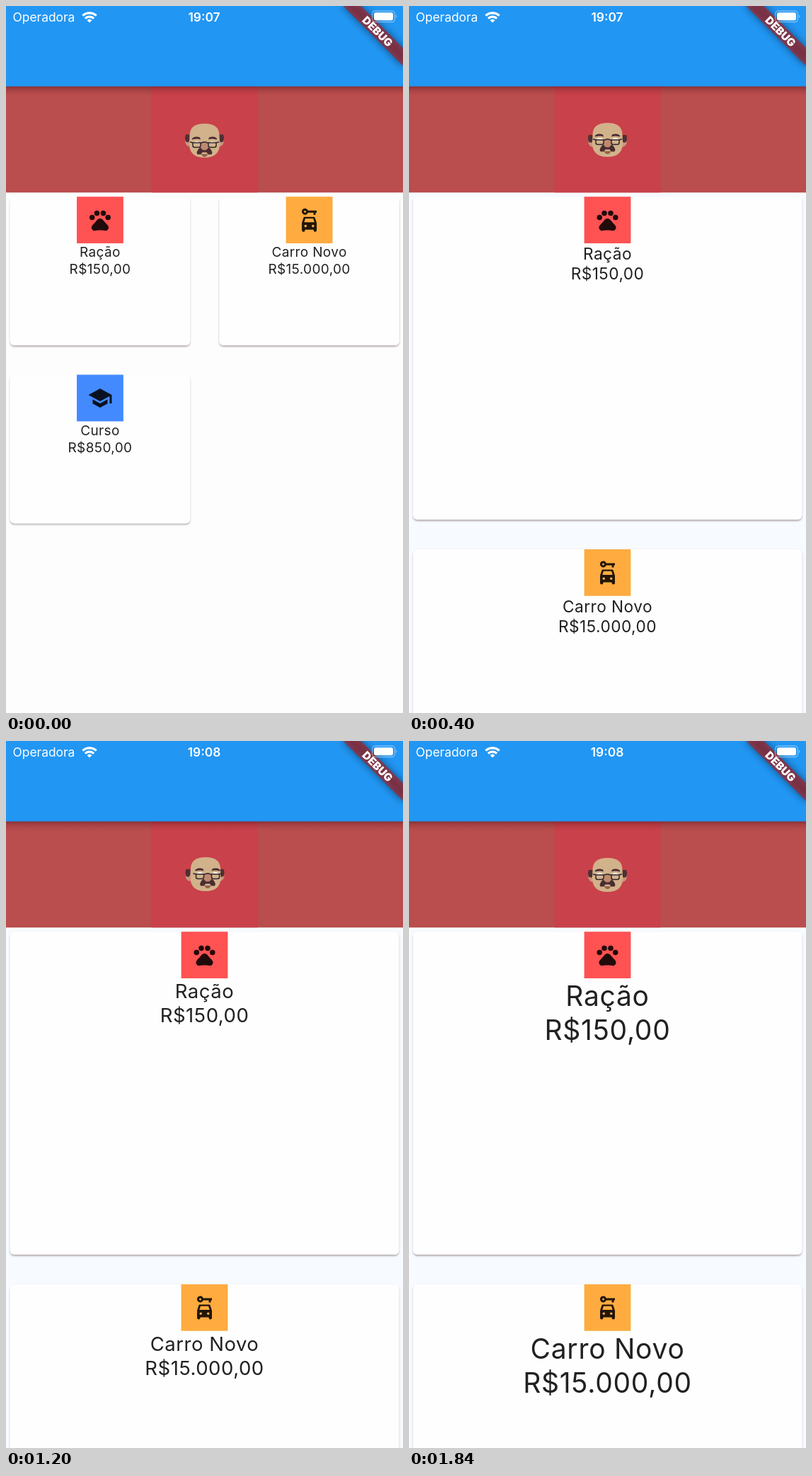
An HTML page for the animation above (2000 ms loop, 561 by 998 pixels).

```html
<!DOCTYPE html>
<html lang="pt">
<head>
<meta charset="utf-8">
<title>Lista de metas</title>
<style>
  html, body { margin: 0; width: 100%; height: 100%; overflow: hidden; background: #fdfdfd; }
  svg { display: block; width: 100%; height: 100%; }
  text { font-family: Inter, Roboto, sans-serif; }
  .label { fill: #212121; text-anchor: middle; letter-spacing: .019em; }
  .status { fill: #fff; font-size: 17.4px; }
</style>
</head>
<body>
<svg viewBox="0 0 561 998">
  <defs>
    <filter id="lift" x="-5%" y="-5%" width="110%" height="112%">
      <feDropShadow dx="0" dy="2" stdDeviation="1.1" flood-color="#201010" flood-opacity=".26"/>
      <feDropShadow dx="0" dy="1" stdDeviation="1.8" flood-color="#000" flood-opacity=".08"/>
    </filter>
    <filter id="blur" x="-30%" y="-150%" width="160%" height="400%">
      <feGaussianBlur stdDeviation="5.9"/>
    </filter>
    <linearGradient id="shade" x1="0" y1="0" x2="0" y2="1">
      <stop offset="0" stop-color="#4a0c10" stop-opacity=".45"/>
      <stop offset=".4" stop-color="#4a0c10" stop-opacity=".18"/>
      <stop offset="1" stop-color="#4a0c10" stop-opacity="0"/>
    </linearGradient>

    <g id="paw">
      <circle cx="4.5" cy="9.5" r="2.5"/><circle cx="9" cy="5.5" r="2.5"/>
      <circle cx="15" cy="5.5" r="2.5"/><circle cx="19.5" cy="9.5" r="2.5"/>
      <path d="M17.3 14.9L14.9 12C14 11 13.2 10.5 12 10.5S10 11 9.1 12L6.7 14.9C5.3 16.3 3.7 17.7 4 19.7C4.3 20.7 5 21.7 6.4 22C7.1 22.2 9.4 21.6 12 21.6S16.9 22.2 17.6 22C18.9 21.7 19.7 20.7 20 19.7C20.3 17.7 18.6 16.2 17.3 14.9z"/>
    </g>
    <g id="car" fill-rule="evenodd">
      <path d="M10.8 3a3 3 0 1 0 0 2H16v2h2V5h1V3zM8 5a1 1 0 1 1 0-2a1 1 0 0 1 0 2z"/>
      <path d="M7.6 9h8.8q.7 0 1 .7L19 14.7v6.8a1.5 1.5 0 0 1-3 0V21H8v.5a1.5 1.5 0 0 1-3 0v-6.8l1.6-5q.3-.7 1-.7zM8.3 10.6L7.2 14h9.6l-1.1-3.4zM8.5 18.8a1.2 1.2 0 1 0 0-2.4a1.2 1.2 0 0 0 0 2.4zM15.5 18.8a1.2 1.2 0 1 0 0-2.4a1.2 1.2 0 0 0 0 2.4z"/>
    </g>
    <g id="cap">
      <path d="M5 13.2v4L12 21l7-3.8v-4L12 17zM12 3L1 9l11 6 9-4.9V17h2V9z"/>
    </g>
  </defs>

  <rect id="page" width="561" height="998"/>
  <g id="cards"></g>

  <rect y="113" width="561" height="150.3" fill="#ba4d4d"/>
  <rect x="205.7" y="113" width="149.6" height="150.3" fill="#c9414a"/>
  <rect y="113" width="561" height="13" fill="url(#shade)"/>
  <rect width="561" height="113.5" fill="#2196f3"/>

  <g id="head">
    <g id="ears">
      <g id="earL"><path d="M260 185h-3q-4 1-4 6q1 8 7 8z" fill="#c9977d"/><path d="M260 182h-6q-2 5 0 10l4 1 2-4z" fill="#4f2f35"/></g>
      <g id="earR"><path d="M301 185h3q4 1 4 6q-1 8-7 8z" fill="#c9977d"/><path d="M301 182h6q2 5 0 10l-4 1-2-4z" fill="#4f2f35"/></g>
    </g>
    <path d="M280.500 165C294 165 301 170 301.500 181L302 194C302 206 295 213 280.500 213S259 206 259 194L259.500 181C260 170 267 165 280.500 165z" fill="#d2b28b"/>
    <g id="features">
      <path d="M276 205h9q-1 4-4.500 4t-4.500-4z" fill="#94624c"/>
      <path id="eyes" d="M264 188.500q5.500-5 11 0zM286 188.500q5.500-5 11 0z" fill="#fff"/>
      <path d="M274 196h13q3 2 4.500 7l-1 2.500h-5l-2-3h-6l-2 3h-5l-1-2.500q1.500-5 4.500-7z" fill="#4a2c31"/>
      <rect x="275" y="187" width="11" height="12.500" rx="5.300" fill="#bd8a70"/>
      <path d="M262.500 183.500q4-5 11.500-2l1 3q-5-2-11.500 0zM298.500 183.500q-4-5-11.500-2l-1 3q5-2 11.500 0z" fill="#4a2c31"/>
      <path d="M264 189h11v4q0 2.500-2.500 2.500h-6q-2.500 0-2.500-2.500zM286 189h11v4q0 2.500-2.500 2.500h-6q-2.500 0-2.500-2.500zM275 190q5.500-4 11 0M264 189l-4-1M297 189l4-1" fill="none" stroke="#30242a" stroke-width="1.500"/>
    </g>
  </g>

  <g transform="translate(561 0) rotate(45)">
    <rect x="-59.8" y="41.9" width="119.6" height="17.9" fill="#000" fill-opacity=".5" filter="url(#blur)"/>
    <rect x="-59.8" y="41.9" width="119.6" height="17.9" fill="#b71c1c" fill-opacity=".627"/>
    <text y="56.400" text-anchor="middle" font-size="15.3" font-weight="900" fill="#fff">DEBUG</text>
  </g>

  <text class="status" x="9.500" y="22">Operadora</text>
  <text class="status" id="clock" x="280" y="22" text-anchor="middle" font-weight="600"></text>
  <g fill="none" stroke="#fff" stroke-width="3.200">
    <path d="M108.300 13.700a14 14 0 0 1 19.400 0M111.900 17.600a8.800 8.800 0 0 1 12.200 0"/>
    <path d="M114.600 20.200a5 5 0 0 1 6.800 0L118 23.600z" fill="#fff" stroke="none"/>
  </g>
  <rect x="517.500" y="7" width="32" height="15.500" rx="4.500" fill="none" stroke="#fff" stroke-opacity=".4" stroke-width="1.300"/>
  <rect x="520" y="9.300" width="27" height="11" rx="2.800" fill="#fff"/>
  <path d="M551 12.300q2 2.500 0 5z" fill="#fff" fill-opacity=".5"/>
</svg>

<script>
const $ = id => document.getElementById(id);
const HOLD = 400;
const GOALS = [
  { name: 'Ração', price: 'R$150,00', icon: 'paw', color: '#ff5252' },
  { name: 'Carro Novo', price: 'R$15.000,00', icon: 'car', color: '#ffab40' },
  { name: 'Curso', price: 'R$850,00', icon: 'cap', color: '#448aff' },
];

// size: font size, line: line height, head and look: offsets of the face
const STEPS = [
  { size: 19, line: 24, head: [0, 1], look: [0, 3], grid: true, time: '19:07' },
  { size: 22.7, line: 28.3, head: [0, 0], look: [0, 0], time: '19:07' },
  { size: 25, line: 31.4, head: [0, 0], look: [-3.5, 0], time: '19:07' },
  { size: 27.5, line: 34.5, head: [1.5, -1], look: [3, 0], time: '19:08' },
  { size: 39, line: 48, head: [0, 0], look: [0, 0], time: '19:08' },
];

const move = (id, x, y) => $(id).setAttribute('transform', `translate(${x} ${y})`);

function card(goal, i, { size, line, grid }) {
  const w = grid ? 254.3 : 549.4;
  const h = grid ? 209.8 : 455.8;
  const x = 5.8 + (grid ? (i % 2) * 295.6 : 0);
  const y = 269.2 + (grid ? Math.floor(i / 2) * 251.3 : i * 497.7);
  const mid = x + w / 2;
  const base = y + 65.8 + line * .809;
  const label = (s, dy) =>
    `<text class="label" x="${mid}" y="${base + dy}" font-size="${size}">${s}</text>`;
  return `<rect x="${x}" y="${y}" width="${w}" height="${h}" rx="6" fill="#fefefe" filter="url(#lift)"/>
    <rect x="${mid - 32.9}" y="${y}" width="65.8" height="65.8" fill="${goal.color}"/>
    <use href="#${goal.icon}" transform="translate(${mid - 18} ${y + 15}) scale(1.5)" fill-opacity=".87"/>
    ${label(goal.name, 0)}${label(goal.price, line)}`;
}

function draw(step) {
  const [lx, ly] = step.look;
  $('page').setAttribute('fill', step.grid ? '#fdfdfd' : '#f7fafe');
  $('cards').innerHTML = GOALS.map((g, i) => card(g, i, step)).join('');
  $('clock').textContent = step.time;
  move('head', ...step.head);
  move('features', lx, ly);
  move('ears', -lx / 3, -ly / 2);
  move('eyes', 0, ly / 3);
}

let shown = -1;
function tick(now) {
  const i = Math.floor(now / HOLD) % STEPS.length;
  if (i !== shown) draw(STEPS[shown = i]);
  requestAnimationFrame(tick);
}
tick(performance.now());
</script>
</body>
</html>
```
